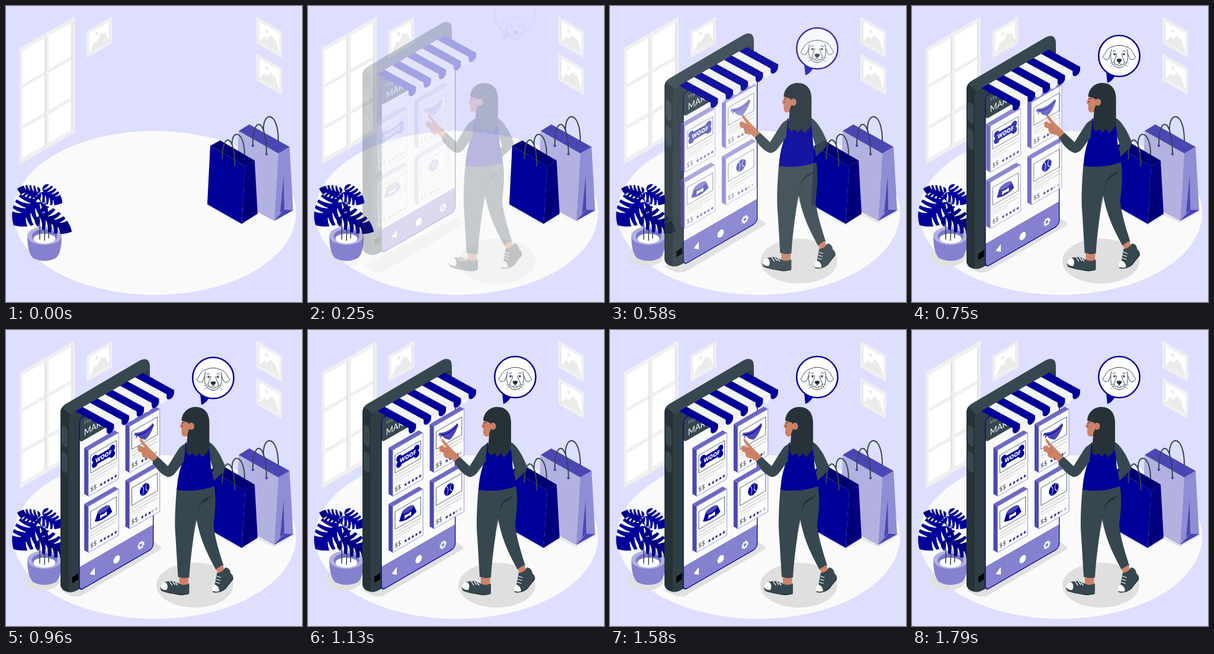
An HTML page that plays this animation: 500 by 500 pixels, repeating every 1.83 s.

```html
<!DOCTYPE html>
<html lang="en">
<head>
<meta charset="utf-8">
<title>Pet market</title>
<style>
html, body { margin: 0; width: 100%; height: 100%; overflow: hidden; background: #dedeff; }
svg { display: block; width: 100vw; height: 100vh; }
text { font-family: "Open Sans", "Noto Sans", sans-serif; }
.title { font-family: Lato, sans-serif; }
.star { font-family: "DejaVu Sans", sans-serif; }
.line { fill: none; stroke-linecap: round; stroke-linejoin: round; }
</style>
</head>
<body>
<svg id="stage" viewBox="0 0 500 500"></svg>
<script>
const BLUE = '#000099', MID = '#4a47b3', SOFT = '#8581cf', PALE = '#b3b1e0';
const DARK = '#263238', GREY = '#37474f', SKIN = '#cd8266';

const poly = (points, fill) => `<polygon points="${points}" fill="${fill}"/>`;
const path = (d, fill) => `<path d="${d}" fill="${fill}"/>`;
const line = (d, color, width) => `<path class="line" d="${d}" stroke="${color}" stroke-width="${width}"/>`;
const rect = (x, y, w, h, fill, more = '') => `<rect x="${x}" y="${y}" width="${w}" height="${h}" fill="${fill}" ${more}/>`;
const oval = (x, y, rx, ry, fill, more = '') => `<ellipse cx="${x}" cy="${y}" rx="${rx}" ry="${ry}" fill="${fill}" ${more}/>`;
const dot = (x, y, r, fill, more) => oval(x, y, r, r, fill, more);
const group = (id, content) => `<g id="${id}">${content}</g>`;
const at = (x, y, content) => `<g transform="translate(${x} ${y})">${content}</g>`;
// Isometric wall plane: rises to the right when side is -1, falls when 1
const iso = (x, y, content, side = -1) => `<g transform="matrix(.866 ${side / 2} 0 1 ${x} ${y})">${content}</g>`;

function room() {
  const columns = [[7, 43], [58, 44]], rows = [[7.5, 56], [70, 63], [140, 48]];
  let panes = rect(0, 0, 108.5, 196, '#f0f0f0') + rect(0, 0, 2, 196, '#e6e6e6');
  for (const [x, w] of columns) {
    for (const [y, h] of rows) panes += rect(x, y, w, h, '#fff');
    panes += rect(x + w, 7, 2.5, 183, '#e2e2e2');
  }
  const picture = (shade) => rect(0, 0, 50, 45, '#f0f0f0') + rect(shade, 5, 3, 36, '#e0e0e0') +
    rect(5.5, 6, 39, 33, '#fff') + poly('6,39 16,25 20,28 29,17 33,21 36,20 44,36 44,39', '#ebebeb') +
    dot(20, 14, 3, '#ebebeb');
  return oval(251, 349.5, 239, 138.5, '#fafafa') + iso(22, 72, panes) + iso(136, 43, picture(43)) +
    iso(423, 18, picture(4), 1) + iso(423, 80.5, picture(4), 1);
}

function bags() {
  return poly('393,211 460,249 453,363 388,328', PALE) +
    poly('460,249 479,238 485,345 453,363', '#8f8dd4') +
    poly('469,288 470,344 463,350', MID) + poly('470,344 485,345 453,363', MID) +
    poly('393,211 411,200 479,238 460,249', MID) +
    line('M435 211C433 178 460 175 460 228', GREY, 2) +
    line('M417 236C416 185 440 187 440 250', GREY, 2) + dot(417, 236, 2.3, MID) + dot(440, 250, 2.3, MID) +
    poly('345,236 404,271 398,368 340,335', BLUE) +
    poly('404,271 420,261 425,351 398,368', '#000080') +
    poly('411,303 411,351 399,367', '#000073') +
    poly('345,236 362,227 420,261 404,271', '#000073') +
    line('M382 235C380 208 403 209 403 251', GREY, 2) +
    line('M365.500 258C365 213 386.500 215 386.500 270', GREY, 2);
}

function plant() {
  let slits = '';
  for (const s of [-1, 1])
    for (const x of [-2, 8, 18, 28]) slits += `M${x + 3} ${6 * s}Q${x + 7} ${14 * s} ${x + 9} ${31 * s}H${x + 14}Q${x + 11} ${14 * s} ${x + 3} ${6 * s}Z`;
  const defs = `<defs><mask id="slits" maskUnits="userSpaceOnUse" x="-20" y="-40" width="90" height="80">
    ${rect(-20, -40, 90, 80, '#fff')}<path d="${slits}" stroke="#000" stroke-linejoin="round"/></mask>
    <path id="leaf" mask="url(#slits)" d="M4 0C-6 -4 -8 -26 10 -27C30 -28 45 -14 52 0C45 14 30 28 10 27C-8 26 -6 4 4 0"/></defs>`;
  const leaf = (x, y, turn, sx, sy, fill) =>
    `<use href="#leaf" fill="${fill}" transform="translate(${x} ${y}) rotate(${turn}) scale(${sx} ${sy})"/>`;
  return defs +
    path('M36 388C36 408 40 421 46 426Q65 435 84 426C91 420 94 408 94 388Z', SOFT) +
    oval(65, 388, 29, 15.5, PALE) + oval(65, 389, 21.5, 12, '#7b77c9') + oval(65, 393, 18.5, 8.5, '#fff') +
    line('M57 394Q58 360 54 338M65 396Q68 340 52 316M72 392Q73 365 63 318', GREY, 1.6) +
    leaf(54, 318, 195, .7, .46, '#000080') + leaf(61, 313, 30, .76, .6, BLUE) +
    leaf(54, 329, 135, 1.12, 1.05, BLUE) + leaf(58, 353, 28, 1.16, .74, '#000080');
}

function card(x, y, item, stars) {
  const rating = (n, left, fill) => `<text class="star" x="${left}" y="73" font-size="7.9" fill="${fill}">${'★'.repeat(n)}</text>`;
  const box = poly('-7,-4 0,0 0,78 -7,74', MID) + poly('-7,-4 44,-33.500 51,-29.500 0,0', '#6c69c4');
  const face = rect(0, 0, 59, 78, '#fafafa', `stroke="${SOFT}" stroke-width=".8"`) +
    rect(4.5, 11, 50, 30, '#fff', `stroke="${GREY}" stroke-width=".8"`) +
    rect(4.5, 45.5, 50, 2.5, '#dcdcdc') + rect(4.5, 51, 50, 2.5, '#dcdcdc') + rect(4.5, 56, 30, 2, '#e4e4e4') +
    `<text x="3.500" y="73" font-size="11.500" fill="${GREY}">$$</text>` +
    rating(stars, 21.5, BLUE) + rating(5 - stars, 21.5 + stars * 6.6, '#a5abb0') + at(29.5, 25, item);
  return at(x, y, box + iso(0, 0, face));
}

function cards() {
  const bone = (s, fill) => [[-17, -5], [-17, 5], [17, -5], [17, 5]].map(([x, y]) => dot(x * s, y * s, 5.5 * s, fill)).join('') +
    rect(-17 * s, -7 * s, 34 * s, 14 * s, fill);
  const treat = bone(1, BLUE) +
    '<text y="3.700" font-size="10" font-weight="800" fill="#fff" text-anchor="middle">WOOF</text>';
  const scarf = path('M-19 -9Q0 0 16 -8L18 -4Q13 9 2 13Q-8 8 -13 -1L-18 2L-16 -4L-21 -4Z', MID) +
    line('M-16 -4Q0 4 17 -4', BLUE, 1.2);
  const bowl = path('M-12 -5L-17 7Q0 15 17 7L12 -5Z', BLUE) + oval(0, -5, 12, 4.5, MID) + at(0, 4.5, bone(.3, '#fff'));
  const ball = dot(0, 1, 9.5, BLUE) + line('M-5 -7Q1 0 -4 8M5 -7Q-1 1 6 6', '#fff', 1);
  return card(214, 163, scarf, 4) + card(214, 258, ball, 3) + card(144.5, 203, treat, 5) + card(144.5, 298, bowl, 5);
}

function awning() {
  const dx = 114 / 9, dy = -65 / 9;
  let out = '';
  for (let i = 0; i < 9; i++) {
    const x = 117 + dx * i, y = 137 + dy * i, fx = x + 53, fy = y + 29;
    out += path(`M${x} ${y}l${dx} ${dy}l53 29v4c0 10 ${-dx} 17 ${-dx} 7v-4Z`, i % 2 ? '#f4f4f8' : BLUE) +
      line(`M${fx} ${fy}l${dx} ${dy}`, i % 2 ? '#d9d9ea' : '#00007a', .8);
  }
  return out;
}

function phone() {
  const screen = rect(0, 0, 144, 290, '#fafafa', 'rx="7"') + rect(0, 0, 144, 40, GREY, 'rx="6"') +
    `<text x="9" y="14" font-size="7" fill="#fff">11:50</text>
     <text class="title" x="9" y="33" font-size="15" fill="#fff">MARKET</text>` +
    path('M0 250H144V283Q144 290 137 290H7Q0 290 0 283Z', SOFT) +
    rect(0, 0, 144, 290, 'none', `rx="7" stroke="${BLUE}" stroke-width="1.500"`) +
    poly('20,272 30,265.500 30,278.500', '#fff') + dot(72.7, 273.4, 6.3, '#fff') +
    dot(120, 273, 4, 'none', 'stroke="#fff" stroke-width="2.500"') +
    dot(120, 273, 5.7, 'none', 'stroke="#fff" stroke-width="2" stroke-dasharray="2.240"');
  const button = (y) => path(`M94 ${y + 3}q0 -6 5 -3t5 9v22q0 6 -5 3t-5 -9Z`, GREY);
  return path('M92 140Q92 130 100 125L226 51Q242 44 243 60V365L124 436Q112 446 102 441Q92 438 92 428Z', GREY) +
    path('M92 140Q92 134 95 130L109 143Q106 146 106 152V442Q92 440 92 428Z', DARK) +
    path('M106 152Q106 144 113 140L232 71Q243 65 243 74V372L124 437Q107 447 106 434Z', '#2f3d45') +
    path('M112 417L122 410V421L112 427Z', '#000') + button(162) + button(206) +
    iso(124, 150, screen) + group('cards', cards()) + awning();
}

function woman() {
  const arm = path('M342 189C352 193 363 213 369 228Q371 234 365 241L349 256L344 246L350 237L343 214Z', GREY);
  const legs = path('M288 266C285 300 284 330 286 350L290 417Q300 421 309 418C311 385 315 360 319 330' +
    'L321 318C326 348 336 372 354 405L367 398C360 375 353 355 350 330C353 305 355 285 351 262Z', GREY) +
    path('M349 279Q327 285 325 300L318 342L321 318Q327 296 330 293Q341 287 349 279Z', DARK);
  const shoes = path('M292 417Q300 421 308 418L307 432H292Z', SKIN) +
    path('M354 404L365 397L370 407L359 413Z', SKIN) +
    path('M260 436Q259 427 268 425L281 424L291 428Q300 433 309 428V445Q300 450 288 447L268 442Q260 440 260 436Z', GREY) +
    path('M260 434Q260 427 268 425Q275 430 271 439Q263 440 260 434Z', '#fafafa') +
    line('M276 425l4 6M281 425l4 5M286 427l3 4', '#fff', 1.3) +
    line('M262 440Q280 448 308 446', DARK, 1.2) +
    path('M356 410Q365 410 370 401Q378 402 379 411Q385 416 383 422L370 437Q360 445 348 442Q345 436 352 431Z', GREY) +
    path('M348 442Q345 435 352 430Q360 433 360 441Q354 444 348 442Z', '#fafafa') +
    line('M354 426l6 2M355 421l6 2M356 416l6 2', '#fff', 1.3) + line('M382 421L370 437Q360 445 349 442', DARK, 1.4);
  const torso = path('M303 190Q322 198 341 190L344 210Q345 222 346 235Q351 250 351 264Q320 275 288 270' +
    'Q289 250 294 234Q301 212 299 196Z', BLUE);
  const reach = path('M303 192Q295 194 288 206L273 230L256 214L247 222C252 234 262 244 272 248Q279 249 285 242L300 222Z', GREY);
  const hand = path('M247 222L256 214Q250 208 245 203L238 196L228 184Q224 183 226 188L234 199' +
    'L225 195Q220 197 222 201Q222 207 228 206L230 214Q236 218 241 217Z', SKIN) +
    line('M234 199l-4 6M237 203l-5 6', '#a9644c', .7);
  const head = path('M299 150L296 156L293 164L296 166L296 172Q296 180 302 180L306 179L304 194L322 195V150Z', SKIN);
  const hair = path('M296 153C297 138 308 130 320 130C336 130 343 142 343 156V190Q344 204 336 210L331 215L326 208' +
    'L319 215L316 208L309 212Q302 206 304 199Q306 186 306 176Q307 171 309 168L308 157Q302 154 296 153Z', DARK);
  const face = oval(312.5, 162.5, 5, 6, SKIN) + line('M311 160q4 1 2 5', '#a9644c', .8) +
    line('M297 157l4 -1M297 161v2', DARK, 1) + line('M297 173l3 0', '#a9644c', .8);
  return legs + shoes + arm + torso + reach + hand + head + hair + face;
}

function dog() {
  const half = line('M350 63Q343 63 338 66C329 67 326 79 322 83Q327 90 332 86Q336 78 337 70' +
    'M336 77C335 86 336 93 342 98Q346 101 350 101M346 77Q345 84 342 88Q339 94 345 96Q349 96 350 92M339 74q3 -3 5 -1', GREY, 1) +
    line('M343 92l-9 1M343 94l-8 5', GREY, .5) + dot(342, 78, 1.9, DARK) + dot(341.5, 77.3, .6, '#fff');
  return half + `<g transform="matrix(-1 0 0 1 700 0)">${half}</g>` +
    path('M345.500 87Q350 84 354.500 87Q354 91 350 92.500Q346 91 345.500 87Z', DARK) + line('M347 97q3 2 6 0', GREY, .9);
}

const shadows = oval(61, 422, 30, 18, '#e0e0e0') +
  poly('92,440 112,450 125,450 262,370 262,366 250,358', '#e0e0e0') +
  poly('338,336 398,371 425,354 453,367 489,346 480,340 345,320', '#e8e8e8') + oval(319, 431, 65, 38, '#dfdfdf');
const bubble = path('M328 106L330 125Q338 122 343 113Z', BLUE) +
  dot(350, 79.5, 34.7, '#fff', `stroke="${BLUE}" stroke-width="2.500"`);

const stage = document.getElementById('stage');
stage.innerHTML = room() + group('shadows', shadows) + bags() + plant() + group('phone', phone()) +
  group('woman', woman()) + group('bubble', bubble) + group('dog', dog());

// Ease with a slight overshoot: cubic-bezier(.36, -.01, .5, 1.38)
function ease(x) {
  if (x >= 1) return 1;
  const curve = (a, b, s) => 3 * (1 - s) ** 2 * s * a + 3 * (1 - s) * s * s * b + s ** 3;
  let low = 0, high = 1;
  for (let i = 0; i < 24; i++) {
    const s = (low + high) / 2;
    if (curve(.36, .5, s) < x) low = s; else high = s;
  }
  return curve(-.01, 1.38, low);
}

function place(id, x, y, opacity) {
  const part = document.getElementById(id);
  part.setAttribute('transform', `translate(${x} ${y})`);
  part.setAttribute('opacity', Math.min(1, Math.max(0, opacity)));
}

const LOOP = 1830, STEP = LOOP / 44;

function draw(now) {
  const t = Math.floor((now % LOOP + 5) / STEP) % 44 * STEP + 20;
  const enter = ease(t / 1000), slide = ease(t / 1800);
  const drop = 30 * (enter - 1);
  place('shadows', 0, 0, enter);
  place('phone', 0, drop, enter);
  place('cards', 30 * (slide - 1), -drop, .25 + .9 * slide);
  place('woman', drop, 0, enter);
  place('bubble', 0, 3 * drop, enter ** 3);
  place('dog', 0, 2 * drop, enter ** 2);
}

const start = performance.now();
function tick() {
  draw(performance.now() - start);
  requestAnimationFrame(tick);
}
tick();
</script>
</body>
</html>
```
